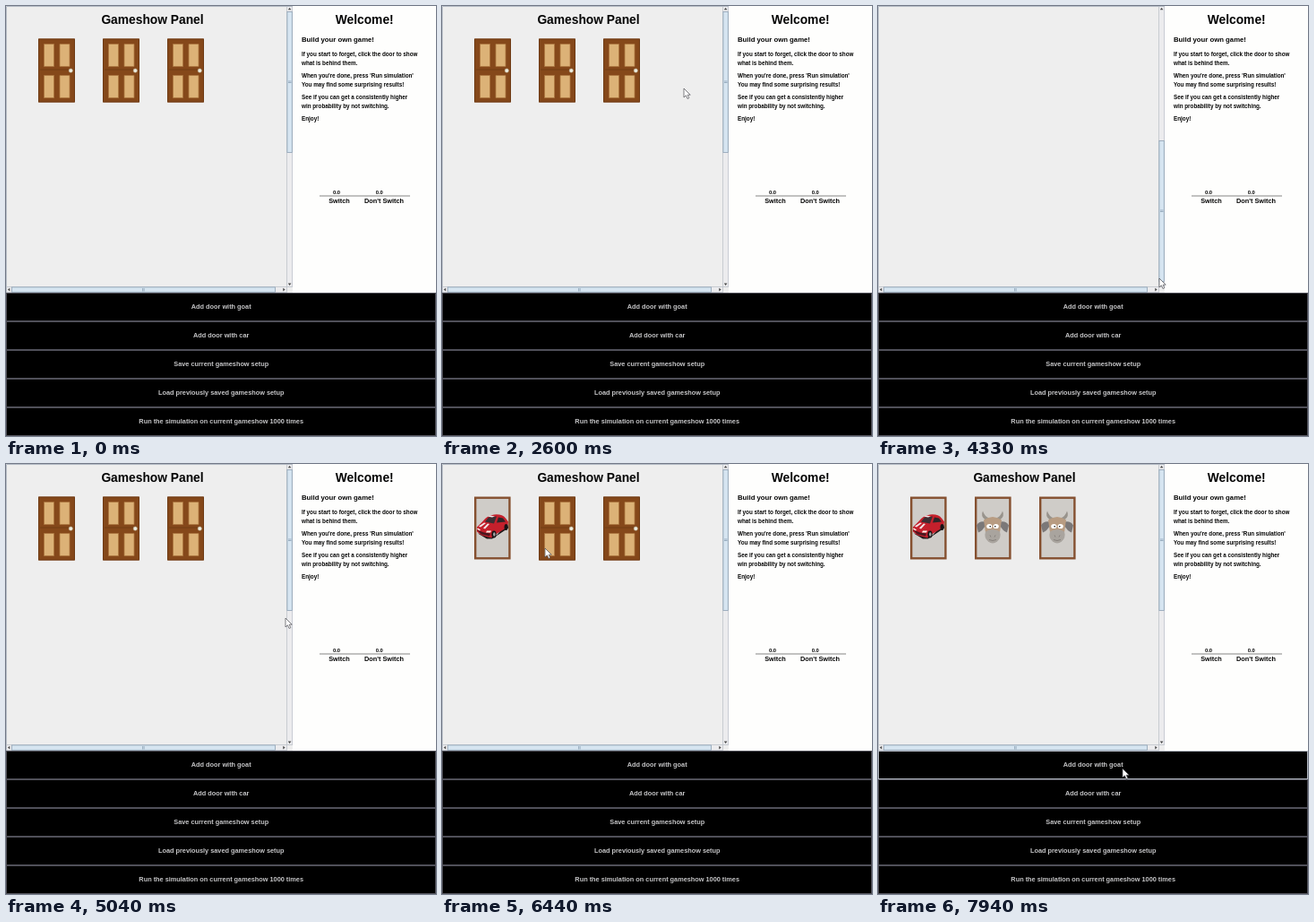
An HTML page for the animation above (8 s loop, 480 px wide and 480 px high).

```html
<!DOCTYPE html>
<html lang="en">
<head>
<meta charset="utf-8">
<title>Gameshow Panel</title>
<style>
html, body { margin: 0; width: 100%; height: 100%; overflow: hidden; background: #fff; }
svg { display: block; width: 100vw; height: 100vh; }
text { font: bold 6.3px "Liberation Sans", Arial, sans-serif; fill: #050505; }
.title { font-size: 13.8px; text-anchor: middle; }
.sub { font-size: 7.75px; }
.label { font-size: 7.33px; text-anchor: middle; }
.value { font-size: 5.8px; text-anchor: middle; }
.button text { fill: #c6c6c8; }
.button rect { fill: #000; stroke: #505059; }
.button.hover rect { stroke: #b4bac4; }
.bar { fill: #ececee; stroke: #b9bec6; stroke-width: .7; }
.thumb { fill: #d6e5f1; stroke: #8ea1b3; stroke-width: .8; }
.arrow { fill: #444; }
.grip { stroke: #8097ad; stroke-width: .7; }
</style>
</head>
<body>
<svg viewBox="0 0 480 480" preserveAspectRatio="none">
  <defs>
    <clipPath id="view"><rect width="313" height="313"/></clipPath>
    <g id="closed">
      <rect width="41" height="71" fill="#85481a"/>
      <path d="M.5.5H40.5V70.5H.5Z" fill="none" stroke="#6e3a14"/>
      <path d="M6.5 6H17.5V31H6.5ZM24 6H35V31H24ZM6.5 41H17.5V66H6.5ZM24 41H35V66H24Z"
        fill="#dcb277" stroke="#ac7840" stroke-width=".8"/>
      <path d="M2 34.5H39" stroke="#6b3a14" stroke-width=".8"/>
      <circle cx="36.3" cy="35.6" r="2.2" fill="#eeeee0" stroke="#b7a68a" stroke-width=".5"/>
    </g>
    <g id="frame">
      <rect x="1.2" y="1.2" width="38.2" height="67.6" fill="#cfccc8" stroke="#855030" stroke-width="2.4"/>
    </g>
    <g id="car">
      <path d="M4 41L14 47L20 47L38 35L37 29L25 43Z" fill="#201a1a"/>
      <path d="M3 34L9 28Q14 21 22 20Q31 19 35 24L38 28L37 34L24 42L19 46L8 43L3 39Z" fill="#c4202c"/>
      <path d="M12 28L16 23L25 22L22 30Z" fill="#3b2e33"/>
      <path d="M25 29L27 23L32 24L35 28Z" fill="#2d2528"/>
      <path d="M5 33L11 29L13 29.5L7 34ZM10 35L15 30L17 30.4L12 36ZM15 22L18 21L23 22L20 23Z" fill="#f4e8ea"/>
      <path d="M3 37L11 40L18 41L17 44L8 42Z" fill="#4c1720"/>
      <path d="M4 35L7 37L6 38L3 36ZM14 38L19 38L18 40L13 40Z" fill="#fff4ec"/>
      <ellipse cx="22" cy="42" rx="2.6" ry="4" fill="#161214"/>
      <ellipse cx="22.3" cy="42" rx="1.2" ry="2.2" fill="#a8a6a8"/>
      <ellipse cx="35.5" cy="34" rx="2" ry="3.6" fill="#161214"/>
    </g>
    <g id="goat">
      <path d="M12 26Q6 22 9 16Q11 22 16 24ZM28 26Q34 22 31 16Q29 22 24 24Z" fill="#98938c"/>
      <path d="M11 28Q5 27 2 32L4 40Q9 38 12 32ZM29 28Q35 27 38 32L36 40Q31 38 28 32Z" fill="#7b7878"/>
      <path d="M10 26Q20 19 30 26L28 40Q25 51 20 51Q15 51 12 40Z" fill="#b89c82"/>
      <path d="M12 39Q20 34 28 39Q30 46 25 50Q20 54 15 50Q10 46 12 39Z" fill="#a9a49e"/>
      <path d="M17 43L18 45M23 43L22 45M16 48Q20 50 24 48" fill="none" stroke="#77726d" stroke-width=".7"/>
      <ellipse cx="16.3" cy="33" rx="3.1" ry="2.6" fill="#fff"/>
      <ellipse cx="23.7" cy="33" rx="3.1" ry="2.6" fill="#fff"/>
      <circle cx="17.2" cy="33.3" r=".8"/><circle cx="22.8" cy="33.3" r=".8"/>
    </g>
  </defs>

  <rect width="480" height="480" fill="#fefefd"/>
  <rect width="320" height="320" fill="#eee"/>
  <g clip-path="url(#view)">
    <g id="content"><text class="title" x="163.5" y="20.3">Gameshow Panel</text></g>
  </g>

  <rect class="bar" x="313.4" y=".4" width="6.3" height="313"/>
  <rect class="bar" x=".4" y="313.4" width="313" height="6.3"/>
  <g id="thumb">
    <rect class="thumb" x="313.9" y="6.5" width="5.4" height="157"/>
    <path class="grip" d="M315 84H318.5M315 85.5H318.5"/>
  </g>
  <rect class="thumb" x="6.5" y="313.9" width="294" height="5.4"/>
  <path class="grip" d="M152.6 315V318.5M154.1 315V318.5"/>
  <path class="arrow" d="M314.8 4.3H318.4L316.6 2ZM314.8 309.6H318.4L316.6 311.9ZM4.3 314.8V318.4L2 316.6ZM309.3 314.8V318.4L311.6 316.6Z"/>
  <path d="M.5 320V.5H320" fill="none" stroke="#b6bdc6"/>

  <text class="title" x="400.2" y="20.3">Welcome!</text>
  <text class="sub" x="330" y="40">Build your own game!</text>
  <g id="help"></g>
  <path d="M350 212H451" stroke="#777" stroke-width=".9"/>
  <text class="value" x="369" y="210">0.0</text>
  <text class="value" x="416.8" y="210">0.0</text>
  <text class="label" x="372" y="220">Switch</text>
  <text class="label" x="422" y="220">Don't Switch</text>
  <g id="buttons"></g>
  <path id="cursor" d="M0 0V10L2.4 7.8L4 11.5L5.8 10.7L4.2 7.2H7.2Z" fill="#fff" stroke="#4a4a50" stroke-width=".7"/>
</svg>
<script>
const LOOP = 8000;
const $ = id => document.getElementById(id);

function add(parent, name, attrs, label = "") {
  const el = document.createElementNS("http://www.w3.org/2000/svg", name);
  for (const key in attrs) el.setAttribute(key, attrs[key]);
  el.textContent = label;
  return parent.appendChild(el);
}

[
  [56.3, "If you start to forget, click the door to show"],
  [66.3, "what is behind them."],
  [80.3, "When you're done, press 'Run simulation'"],
  [90.3, "You may find some surprising results!"],
  [104.3, "See if you can get a consistently higher"],
  [114.3, "win probability by not switching."],
  [128.3, "Enjoy!"]
].forEach(([y, line]) => add($("help"), "text", { x: 330, y }, line));

const buttons = [
  "Add door with goat",
  "Add door with car",
  "Save current gameshow setup",
  "Load previously saved gameshow setup",
  "Run the simulation on current gameshow 1000 times"
].map((label, i) => {
  const y = 320 + 32 * i;
  const g = add($("buttons"), "g", { class: "button" });
  add(g, "rect", { x: .5, y: y + .5, width: 479, height: 31 });
  add(g, "text", { class: "label", x: 240.2, y: y + 18.3 }, label);
  return g;
});

const doors = [["car", 6120], ["goat", 6580], ["goat", 7000]].map(([prize, opens], i) => {
  const g = add($("content"), "g", { transform: `translate(${36 + 72 * i} 36.5)` });
  const closed = add(g, "use", { href: "#closed" });
  const open = add(g, "g", {});
  add(open, "use", { href: "#frame" });
  add(open, "use", { href: "#" + prize });
  return { closed, open, opens };
});

// Pointer tip: time, x, y
const path = [
  [0, -12, 4], [250, -12, 4], [900, 165, 105], [1100, 165, 105],
  [2500, 270, 92], [2700, 270, 92], [3400, 315, 160],
  [3500, 315, 160], [4150, 314, 304], [4400, 314, 304], [4900, 315, 160],
  [5000, 315, 160], [5250, 270, 328], [5600, 164, 104], [5760, 164, 104],
  [6080, 57, 92], [6180, 57, 92], [6540, 128, 95], [6640, 128, 95],
  [6950, 199, 101], [7150, 199, 101], [7500, 273, 340], [8000, 273, 340]
];

function pointerAt(t) {
  const i = path.findIndex(step => step[0] > t);
  const [t0, x0, y0] = path[i - 1], [t1, x1, y1] = path[i];
  const p = (t - t0) / (t1 - t0), e = p * p * (3 - 2 * p);
  return [x0 + (x1 - x0) * e, y0 + (y1 - y0) * e];
}

function draw(t) {
  const [x, y] = pointerAt(t);
  const scroll = t >= 3500 && t < 4900 ? y - 160 : 0;
  $("cursor").setAttribute("transform", `translate(${Math.round(x)} ${Math.round(y)})`);
  $("thumb").setAttribute("transform", `translate(0 ${scroll})`);
  $("content").setAttribute("transform", `translate(0 ${-2 * scroll})`);
  for (const door of doors) {
    const isOpen = t >= door.opens;
    door.open.style.display = isOpen ? "" : "none";
    door.closed.style.display = isOpen ? "none" : "";
  }
  buttons.forEach((b, i) => b.classList.toggle("hover", Math.floor((y - 320) / 32) === i));
}

const start = performance.now();
function tick() {
  draw((performance.now() - start) % LOOP);
  requestAnimationFrame(tick);
}
tick();
</script>
</body>
</html>
```
